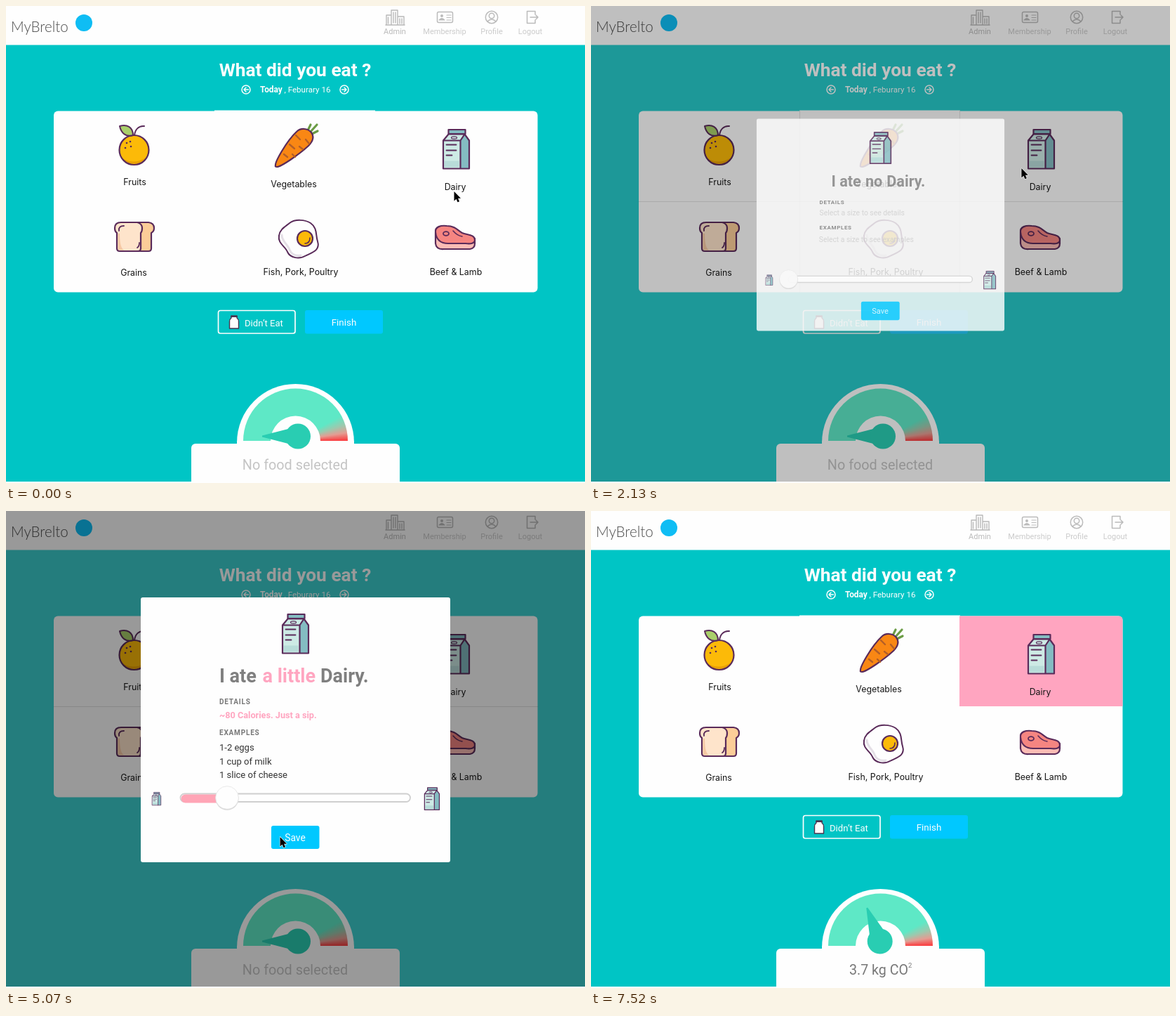
Recreate the animation shown at these times as an HTML page with a canvas. Size 825 by 679 pixels, loop 8180 ms.

```html
<!DOCTYPE html>
<html lang="en">
<head>
<meta charset="utf-8">
<title>Food diary</title>
<style>
html, body { margin: 0; width: 100%; height: 100%; overflow: hidden; background: #fff; }
canvas { display: block; width: 825px; height: 679px; }
</style>
</head>
<body>
<canvas id="stage" width="825" height="679"></canvas>
<script>
const ctx = document.getElementById('stage').getContext('2d');
const LOOP = 8180;
const INK = '#5a2b5a', CYAN = '#00c8ff', PINK = '#ffa5c0', GREY = '#c4c4c4';

// Cursor waypoints: time, x, y
const CURSOR = [
  [0, 638, 264], [60, 638, 265], [450, 638, 265], [580, 600, 335], [720, 490, 475],
  [800, 380, 528], [890, 430, 518], [1020, 547, 434], [1250, 606, 305], [1420, 628, 250],
  [1700, 613, 231], [2130, 613, 231], [2500, 565, 255], [2750, 550, 268], [2990, 550, 268],
  [3200, 410, 350], [3420, 249, 408], [3500, 249, 408], [3790, 302, 408], [4190, 314, 406],
  [4610, 314, 406], [5070, 390, 464], [5360, 398, 466], [6220, 398, 466], [6480, 373, 560],
  [6680, 390, 645], [6860, 470, 600], [7010, 536, 515], [7070, 540, 520], [7500, 743, 679]
];

const clamp = v => Math.max(0, Math.min(1, v));
const lerp = (a, b, p) => a + (b - a) * p;
const span = (t, from, to) => clamp((t - from) / (to - from));
const smooth = p => p * p * (3 - 2 * p);

function shape(d, fill, stroke, width = 2.2) {
  const path = new Path2D(d);
  if (fill) { ctx.fillStyle = fill; ctx.fill(path); }
  if (stroke) { ctx.strokeStyle = stroke; ctx.lineWidth = width; ctx.stroke(path); }
}

function circle(x, y, r, fill, stroke, width = 2.2) {
  ctx.beginPath();
  ctx.arc(x, y, r, 0, Math.PI * 2);
  if (fill) { ctx.fillStyle = fill; ctx.fill(); }
  if (stroke) { ctx.strokeStyle = stroke; ctx.lineWidth = width; ctx.stroke(); }
}

function box(x, y, w, h, r, fill, stroke, width = 1.5) {
  ctx.beginPath();
  ctx.roundRect(x, y, w, h, r);
  if (fill) { ctx.fillStyle = fill; ctx.fill(); }
  if (stroke) { ctx.strokeStyle = stroke; ctx.lineWidth = width; ctx.stroke(); }
}

function text(str, x, y, size, color, { weight = 400, family = 'Roboto', align = 'left', spacing = 0 } = {}) {
  ctx.font = `${weight} ${size}px ${family}, sans-serif`;
  ctx.letterSpacing = spacing + 'px';
  ctx.textAlign = align;
  ctx.fillStyle = color;
  ctx.fillText(str, x, y);
}

function milk(x, y, scale) {
  ctx.save();
  ctx.translate(x, y);
  ctx.scale(scale, scale);
  shape('M1.5 17L9 8H33L26 17V57H1.5Z', '#cdeae5');
  shape('M26 17L32 8L38.5 17V57H26Z', '#84bcc2');
  shape('M3 46H24V55H3Z', '#b8dcd9');
  shape('M1.5 17L9 8H32L38.5 17V57H1.5ZM1.5 17H26V57M26 17L32 8', null, INK);
  shape('M9 1.5H33V7.5H9Z', '#84bcc2', INK);
  shape('M6 23H20M6 31H20M6 38H14', null, INK, 1.8);
  ctx.beginPath();
  ctx.ellipse(17, 13, 4, 1.6, 0, 0, 7);
  ctx.lineWidth = 1.2;
  ctx.stroke();
  ctx.restore();
}

function orange() {
  circle(182.5, 205, 21, '#fcba08');
  shape('M167 218A21 21 0 0 0 199 216Q184 226 167 218Z', '#e9a005');
  circle(182.5, 205, 21, null, INK);
  shape('M162 171C172 168 181 172 181 184C171 187 164 181 162 171Z', '#a9cf6a', INK, 2);
  shape('M183 184C184 176 189 170 197 171', null, INK, 2);
  for (const [x, y] of [[172, 195], [178, 200], [170, 202], [177, 193]]) circle(x, y, 1.3, INK);
}

function carrot() {
  shape('M430 177L434 169M433 180L443 169M436 182L444 178', null, '#6b9c45', 3.2);
  shape('M384 227C383 222 400 192 414 179C420 173 430 174 435 180C440 187 437 193 431 199C418 211 392 229 386 229Q383 229 384 227Z', '#f98714', INK);
  shape('M413 184L419 190M427 190L432 196M404 197L411 203M418 200L423 204M396 211L401 215M408 211L412 215', null, '#b45f27', 2.4);
}

function bread() {
  shape('M186 308H203Q211 309 211 316Q211 321 207 323V345Q207 349 203 349H186Z', '#fccd98', INK);
  shape('M164 308H187Q194 310 194 316Q194 321 192 323V345Q192 349 188 349H162Q158 349 158 345V323Q155 321 155 316Q155 308 164 308Z', '#fee4cb', INK);
  shape('M159.5 324V345Q160 347.5 163 347.5H168Q162 344 162 324Z', '#f6c9a4');
  shape('M161 320Q160 313 168 313M187 344Q190 342 190 337', null, INK, 1.8);
}

function egg() {
  shape('M404 309C412 303 426 304 434 309C444 316 441 326 444 335C448 348 436 351 428 355C418 361 405 359 401 350C398 342 387 338 389 327C390 318 398 314 404 309Z', '#fefefe', INK, 2);
  shape('M393 326C393 335 402 340 404 347C407 354 413 356 420 355', null, '#e4dfe6', 3);
  circle(426, 331, 11, '#fcba08', INK);
  shape('M433 330Q433 338 426 338', null, INK, 1.6);
}

function steak() {
  shape('M612 322V338Q613 347 624 346H661Q668 345 668 338V331Z', '#fbbcb5', INK);
  shape('M612 322C611 314 620 312 628 313C640 313 643 319 650 323C657 326 668 325 668 333C668 338 662 339 655 338H630C618 338 613 332 612 322Z', '#f58581', INK);
  ctx.beginPath();
  ctx.ellipse(627, 324, 4, 2.8, 0, 0, 7);
  ctx.lineWidth = 1.8;
  ctx.stroke();
  shape('M637 320Q643 327 650 328', null, INK, 1.6);
}

function header() {
  ctx.fillStyle = '#fefefe';
  ctx.fillRect(0, 0, 825, 55.5);
  text('MyBrelto', 7, 37, 20.6, '#4c4c4c', { weight: 300, family: 'Lato' });
  circle(111, 24, 12, '#0fbdf4');

  shape('M542 27V13H549V27M549 27V6H558V27M558 27V15H567V27M541 27H568M544.5 16V25M552 9V24M555 9V24M561 18V25M564 18V25', null, '#b8b8b8', 1.4);
  box(614.5, 8.5, 22, 15, 2, null, '#bbb', 1.5);
  circle(621, 14, 2, '#bbb');
  shape('M617 20Q621 15 625 20ZM628 13H634M628 16.5H634M628 20H634', '#bbb', '#bbb', 1.2);
  circle(692, 16, 8.7, null, '#bbb', 1.5);
  circle(692, 14, 3.7, null, '#bbb', 1.5);
  shape('M686 22Q692 16 698 22', null, '#bbb', 1.5);
  shape('M754 12V7.5H742.5V24.5H754V20M747 16H758M755 13L758 16L755 19', null, '#bbb', 1.5);
  const opts = { align: 'center' };
  text('Admin', 554, 40, 11, '#b9b9b9', opts);
  text('Membership', 625, 40, 11, '#cbcbcb', opts);
  text('Profile', 692, 40, 11, '#cbcbcb', opts);
  text('Logout', 747, 40, 11, '#cbcbcb', opts);
}

function gauge(turn, textMove) {
  const half = (cx, cy, r, fill) => {
    ctx.beginPath();
    ctx.arc(cx, cy, r, Math.PI, 0);
    ctx.fillStyle = fill;
    ctx.fill();
  };
  half(412.5, 621.5, 83.5, '#fefefe');
  ctx.fillStyle = '#fefefe';
  ctx.fillRect(329, 619, 167, 5);
  const scale = ctx.createConicGradient(Math.PI, 412.5, 619);
  scale.addColorStop(0, '#5ee8c6');
  scale.addColorStop(0.42, '#5ee8c6');
  scale.addColorStop(0.45, '#9cc9ae');
  scale.addColorStop(0.475, '#e49c92');
  scale.addColorStop(0.5, '#fb3a3d');
  half(412.5, 619, 74.5, scale);
  half(412.5, 619, 35.5, '#fefefe');
  box(264, 623, 297, 60, 6, '#fefefe');

  ctx.save();
  ctx.translate(lerp(416, 411.7, turn ** 3), 612.5 + Math.sin(Math.PI * turn));
  ctx.rotate(lerp(0, 1.2, turn));
  shape('M-51 -1L-10 -11.5L0 0L-10 11.5L-51 1Z', '#29cdb2');
  circle(0, 0, 18, '#29cdb2');
  ctx.restore();

  const y = 660 + 9 * Math.sin(Math.PI * textMove);
  ctx.globalAlpha = clamp(1 - textMove * 1.5);
  text('No food selected', 412, y, 19.8, GREY, { align: 'center' });
  ctx.globalAlpha = clamp(textMove * 1.5);
  text('3.7 kg CO', 368, y, 19.6, '#777');
  text('2', 452, y - 10, 9.5, '#777');
  ctx.globalAlpha = 1;
}

function page(t, dim, change) {
  const red = Math.round(60 * dim), green = Math.round(lerp(197, 207, dim));
  ctx.fillStyle = `rgb(${red},${green},${green})`;
  ctx.fillRect(0, 0, 825, 679);
  header();

  text('What did you eat ?', 412, 100, 26.3, '#fefefe', { weight: 700, align: 'center' });
  text('Today', 362, 122.5, 11.9, '#fefefe', { weight: 700 });
  text(', Feburary 16', 396.5, 122.5, 11.6, '#fefefe');
  for (const [x, dir] of [[342, -1], [482, 1]]) {
    circle(x, 119, 6, null, '#fefefe', 1.5);
    shape(`M${x - 3.5 * dir} 119H${x + 3 * dir}M${x} 116L${x + 3 * dir} 119L${x} 122`, null, '#fefefe', 1.5);
  }

  box(68, 149.5, 689.5, 258, 6, '#fefefe');
  ctx.fillStyle = '#fefefe';
  ctx.fillRect(297, 148.5, 229, 2);
  ctx.globalAlpha = change;
  box(525, 149.5, 232.5, 128.5, [0, 5, 0, 0], PINK);
  ctx.globalAlpha = 1;
  if (dim > 0) {
    shape('M297.5 149V407M525.5 149V407M68 278.5H758', null, 'rgba(0,0,0,.11)', 1);
  } else if (t > 1000 && t < 1900) {
    shape('M512 278.5H648M525.5 278V406', null, '#f1f1f1', 1);
  }

  orange();
  carrot();
  milk(621.5, 174.5, 1);
  bread();
  egg();
  steak();
  const label = (str, x, y) => text(str, x, y, 12.4, '#161616', { family: 'Inter', align: 'center' });
  label('Fruits', 183.5, 255);
  label('Vegetables', 410, 257.5);
  label('Dairy', 640, 261.5);
  label('Grains', 182, 383.5);
  label('Fish, Pork, Poultry', 420, 382.5);
  label('Beef & Lamb', 641, 382.5);

  box(302.5, 433.5, 109.5, 32.5, 3, null, '#fefefe', 1.7);
  shape('M321 441H329V444Q331.5 446 331.5 449V459H318.5V449Q318.5 446 321 444Z', '#fefefe', '#4a3550', 1.4);
  shape('M321 442H329', null, '#4a3550', 2);
  text('Didn’t Eat', 340, 455.5, 13.1, '#fefefe');
  box(426, 433, 111, 33.5, 3, `rgb(${red},${Math.round(lerp(200, 206, dim))},255)`);
  text('Finish', 481.5, 455, 13.4, '#fefefe', { align: 'center' });
}

function modal(t, scale, alpha) {
  const chosen = t >= 3850;
  ctx.save();
  ctx.globalAlpha = alpha;
  ctx.translate(412.5, 311.5);
  ctx.scale(scale, scale);
  ctx.translate(-412.5, -311.5);
  box(192, 123, 441, 377, 3, '#fefefe');
  milk(392.5, 145.5, 1);

  const heading = (str, x, color = '#7f7f7f') => text(str, x, 244, 27, color, { weight: 700 });
  heading('I ate', chosen ? 304 : 325);
  if (chosen) heading('a little', 365.5, PINK);
  else heading('no', 385.5);
  heading('Dairy.', chosen ? 448 : 423.5);

  const caption = { weight: 700, spacing: 0.8 };
  text('DETAILS', 304, 275, 10, '#777', caption);
  text('EXAMPLES', 304, 319, 10, '#777', caption);
  if (chosen) {
    text('~80 Calories. Just a sip.', 304, 294.5, 12.7, PINK, { weight: 700 });
    ['1-2 eggs', '1 cup of milk', '1 slice of cheese'].forEach((item, i) =>
      text(item, 304, 341 + i * 19.7, 13, '#333'));
  } else {
    text('Select a size to see details', 304, 294.5, 12.9, '#cdcdcd');
    text('Select a size to see examples', 303, 342.5, 12.9, '#cdcdcd');
  }

  const knob = t < 3790 ? lerp(249, 302, span(t, 3500, 3790)) : lerp(302, 315, span(t, 3790, 4150));
  box(248.5, 402.5, 327.5, 11.5, 6, '#fefefe', '#cfcfcf', 1.8);
  if (knob > 250) box(249.5, 403.5, knob - 249, 12, 6, '#ffa5b6');
  circle(knob, 409.3, 16.5, '#d6d6d6');
  circle(knob, 408, 16.3, '#fefefe', '#e4e4e4', 0.8);
  milk(208, 400, 0.33);
  milk(595.5, 393, 0.57);

  box(378, 448, 68.5, 33, 3, CYAN);
  text('Save', 412, 470, 13.8, '#fefefe', { align: 'center' });
  ctx.restore();
}

function cursor(t) {
  if (t >= 7500) return;
  const i = CURSOR.findIndex(k => k[0] > t);
  const [t0, x0, y0] = CURSOR[i - 1], [t1, x1, y1] = CURSOR[i];
  const p = span(t, t0, t1);
  const arrow = 'M.5 0V13.5L3.5 10.8L5.5 15.2L8 14.2L6.1 9.8H10Z';
  ctx.save();
  ctx.translate(lerp(x0, x1, p), lerp(y0, y1, p));
  shape(arrow, null, '#fff', 1.2);
  shape(arrow, '#000');
  ctx.restore();
}

function draw(t) {
  const open = span(t, 1880, 2280);
  const close = span(t, 5540, 5813);
  const dim = close > 0 ? 1 - close : open;
  const change = span(t, 5560, 5840);

  ctx.lineCap = 'round';
  ctx.lineJoin = 'round';
  page(t, dim, change);
  gauge(smooth(change), change);
  ctx.fillStyle = `rgba(0,0,0,${0.4 * dim})`;
  ctx.fillRect(0, 0, 825, 677);
  if (close > 0) {
    const alpha = clamp(1 - close * 1.67);
    if (alpha > 0) modal(t, 0.525 + 0.475 * alpha, alpha);
  } else if (open > 0) {
    modal(t, lerp(0.465, 1, open), 1 - (1 - open) ** 1.7);
  }
  ctx.fillStyle = '#fefefe';
  ctx.fillRect(0, 677, 825, 2);
  cursor(t);
}

const start = performance.now();
function tick() {
  draw((performance.now() - start) % LOOP);
  requestAnimationFrame(tick);
}
tick();
</script>
</body>
</html>
```
